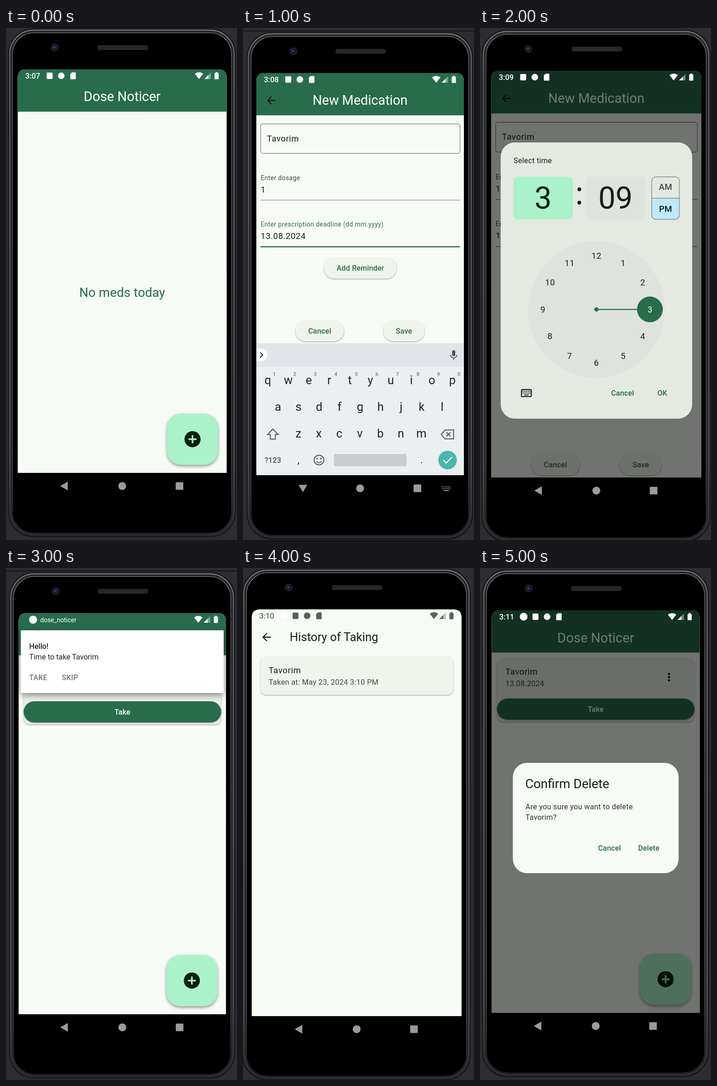
Animation of 503 by 1114 pixels, one loop 6000 ms. Source, as an HTML page:

```html
<!DOCTYPE html>
<html lang="en">
<head>
<meta charset="utf-8">
<title>Medication reminder app</title>
<style>
html, body { margin: 0; width: 100%; height: 100%; overflow: hidden; background: #2c2d31; }
svg {
  position: absolute; inset: 0; width: 100%; height: 100%; visibility: hidden;
  font-family: Roboto, "Noto Sans", sans-serif;
  animation: show 6s step-end infinite;
  animation-delay: calc((var(--i) - 6) * 1s);
}
@keyframes show {
  0% { visibility: visible; }
  16.6667%, 100% { visibility: hidden; }
}
pattern { visibility: visible; }
.mid { text-anchor: middle; }
.med { font-weight: 500; }
.line { fill: none; stroke-width: 2; }
.lift { filter: drop-shadow(0 1.2px 1px #0006); }
.float { filter: drop-shadow(0 3px 3px #0006); }
.high { filter: drop-shadow(0 4px 7px #0007); }
</style>
</head>
<body>
<script>
const GREEN = '#286c4c', PAPER = '#f6fbf5', CARD = '#eff4ed', MINT = '#abf2c9';
const INK = '#171d19', SOFT = '#3f4943', EDGE = '#707972', DIAL = '#dee4dd', KEY = '#17262c';
const APP = 'Dose Noticer', MED = 'Tavorim', DATE = '13.08.2024';

const rect = (x, y, w, h, r, fill, more = '') =>
  `<rect x="${x}" y="${y}" width="${w}" height="${h}" rx="${r}" fill="${fill}" ${more}/>`;
const disc = (x, y, r, fill, more = '') =>
  `<circle cx="${x}" cy="${y}" r="${r}" fill="${fill}" ${more}/>`;
const path = (d, fill, more = '') => `<path d="${d}" fill="${fill}" ${more}/>`;
const line = (d, color, w = 2, more = '') =>
  `<path class="line" d="${d}" stroke="${color}" style="stroke-width:${w}" ${more}/>`;
const text = (x, y, size, str, fill, gap = 0, cls = '') =>
  `<text x="${x}" y="${y}" font-size="${size}" fill="${fill}" letter-spacing="${gap}" class="${cls}">${str}</text>`;
const at = (x, y, body, scale = 1) =>
  `<g transform="translate(${x} ${y}) scale(${scale})">${body}</g>`;

const topRound = ({ l, t, r, b }, bottom = b) =>
  `M${l} ${bottom}V${t + 18}q0 -18 18 -18H${r - 18}q18 0 18 18V${bottom}z`;
const dim = s => path(topRound(s), '#000', 'opacity=".54"');

function shell({ l, t, r, b, band }) {
  const ring = (inset, radius, fill, stroke, w) =>
    rect(l - 20 + inset, t - 88 + inset, r - l + 39 - 2 * inset, b - t + 227 - 2 * inset,
      radius, fill, `stroke="${stroke}" stroke-width="${w}"`);
  const mid = (l + r) / 2, y = t - 47.5;
  return rect(0, 0, 503, 1114, 0, '#2c2d31')
    + (band ? rect(0, 5, 503, 2.5, 0, '#18191b') : '')
    + ring(0, 54, '#0c0c0d', '#1b1c1e', 2)
    + ring(2.5, 52, '#2b2c2f', 'url(#metal)', 1.6)
    + ring(5.5, 49, '#111214', '#303236', 2)
    + ring(8.5, 46, '#000', 'url(#metal)', 1.2)
    + disc(l + 80.5, y, 8.5, '#202127') + disc(l + 80.5, y, 5.5, '#14162a') + disc(l + 80, y - .5, 2.6, '#33407c')
    + rect(mid - 53.5, y - 5, 109.5, 10.5, 4, 'url(#mesh)');
}

const sdCard = c => path('M-2.5 -7.5H5q1 0 1 1V6.5q0 1 -1 1H-5q-1 0 -1 -1V-4z', c);

function status(s, time, c, extra) {
  const y = s.t + 14;
  let x = s.l + 69.5, out = text(s.l + 16.5, y + 6, 16.4, time, c, 0, 'med');
  if (extra) { out += disc(x, y, 8.5, extra); x += 25.8; }
  return out + rect(x - 6.5, y - 7, 13, 14, 2, c) + disc(x + 25.3, y, 7.2, c)
    + at(x + 51, y, sdCard(c)) + signals(s, c);
}

const signals = (s, c) => at(s.r, s.t + 14,
  path('M-69.5 -4.5Q-60.3 -11 -51 -4.5L-60.3 7z', c)
  + path('M-48.5 7L-34.5 -7V7z', c, 'opacity=".4"') + path('M-48.5 7L-40 -1.5V7z', c)
  + rect(-26.5, -6, 9, 13.5, 1.2, c) + rect(-24.2, -8, 4.4, 3, 0, c));

function nav(s, keyboard) {
  const m = (s.l + s.r) / 2, c = '#9b9b9b';
  const keys = [-4, 0].map(y => line(`M-9 ${y}h19`, c, 2, 'stroke-dasharray="2 1.5"')).join('');
  return at(m, s.b + 28.5,
    path(keyboard ? 'M-134 -7.5h19l-9.5 16z' : 'M-135 0L-118.5 -9.5v19z', c)
    + disc(0, 0, 8.6, c) + rect(116.5, -8.3, 16.6, 16.6, 1.5, c)
    + (keyboard ? at(187, 1, keys + line('M-5 4h11', c)) : ''));
}

const bar = s => path(topRound(s, s.t + 92), GREEN);
const back = (x, y, c) => at(x, y, line('M9.3 0H-7.6M.8 -8.5L-7.7 0L.8 8.5', c, 2.3));
const fab = s => at(s.r - 74.3, s.b - 73.3,
  rect(-55.7, -55.7, 111.5, 111.5, 31, MINT, 'class="float"') + disc(0, 0, 17.5, '#02200f')
  + line('M-8.7 0H8.7M0 -8.7V8.7', MINT, 3.6));
const screen = (s, body) => shell(s) + path(topRound(s), PAPER) + body;
const label = (x, y, str, size = 16.1, c = GREEN) => text(x, y, size, str, c, .12, 'mid med');
const body = (x, y, str, size = 18.4, c = INK) => text(x, y, size, str, c, .58);
const small = (x, y, str, c = SOFT, size = 16.2) => text(x, y, size, str, c, .29);
const pill = (x, y, w, str) =>
  rect(x - w / 2, y - 23, w, 46, 23, CARD, 'class="lift"') + label(x, y + 5.5, str);

function form(focus, buttonY) {
  return path('M29 190V116q0 -18 18 -18H463q18 0 18 18V190z', GREEN)
    + back(61.5, 157.5, INK) + text(255, 167, 28.7, 'New Medication', '#fff', 0, 'mid')
    + rect(38.5, 208.7, 434, 64, 4.5, 'none', `stroke="${EDGE}" stroke-width="1.2"`)
    + body(52, 246.5, MED)
    + text(38.5, 331, 13.8, 'Enter dosage', SOFT, .44)
    + body(38.5, 357.5, '1') + line('M38.5 374.5H472.5', EDGE, 1.2)
    + text(38.5, 432, 13.8, 'Enter prescription deadline (dd.mm.yyyy)', focus ? GREEN : SOFT, .44)
    + body(38.5, 459, DATE)
    + line('M38.5 476H472.5', focus ? GREEN : EDGE, focus ? 2.3 : 1.2)
    + pill(255.5, 522.5, 159, 'Add Reminder')
    + pill(167, buttonY, 106, 'Cancel') + pill(350.5, buttonY, 91, 'Save');
}

function keyboard() {
  const row = (keys, x, y) =>
    [...keys].map((k, i) => text(x + i * 44.65, y, 25.5, k, KEY, 0, 'mid')).join('');
  const hints = [...'1234567890'].map((k, i) =>
    text(68 + i * 44.7, 757, 11.5, k, '#737b7f', 0, 'mid med')).join('');
  const g = '#4a5459';
  return rect(29, 686, 452, 287, 0, '#ebeff2') + rect(29, 686, 452, 51, 0, '#e1e5e9')
    + path('M29 697.5h10a14 14 0 0 1 0 28h-10z', '#fff') + line('M37.5 706l5.5 5.5l-5.5 5.5', INK)
    + rect(455.3, 701, 7, 13, 3.5, g) + line('M451.8 711a7 7 0 0 0 14 0M458.8 718v4', g, 1.8)
    + row('qwertyuiop', 54, 775) + hints
    + row('asdfghjkl', 76.3, 833) + row('zxcvbnm', 120.5, 891)
    + line('M65 872.5L53.5 884.5H59.5V894.5H70.5V884.5H76.5z', g)
    + line('M440 874.5H458.5V894H440L431.5 884.2zM443 879.5l9 9m0 -9l-9 9', g)
    + text(65, 946, 16.5, '?123', '#455056', 0, 'mid med')
    + text(121, 947, 22, ',', KEY, 0, 'mid') + text(389, 947, 22, '.', KEY, 0, 'mid')
    + disc(165.5, 940, 10.5, 'none', `stroke="${g}" stroke-width="2"`)
    + disc(161.7, 937, 1.7, g) + disc(169.3, 937, 1.7, g) + line('M160 942.5q5.5 7 11 0', g, 1.8)
    + rect(198, 927, 158, 26.5, 3, '#c8cccf')
    + disc(445.5, 940, 20.2, '#4db6ac') + line('M436.5 940.5l6 6l12.5 -12.5', '#fff', 2.2);
}

function picker() {
  const cx = 253.5, cy = 612.3;
  const hours = Array.from({ length: 12 }, (_, i) => {
    const a = (i + 1) * Math.PI / 6;
    return text(cx + 116.6 * Math.sin(a), cy + 6.3 - 116.6 * Math.cos(a), 18.6, i + 1,
      i === 2 ? '#fff' : INK, .4, 'mid');
  }).join('');
  const keys = [-4, 0].map(y => line(`M-8.2 ${y}h17`, INK, 2.2, 'stroke-dasharray="2.2 1.5"')).join('');
  return rect(45, 249, 417, 601, 31, '#e4e9e2')
    + small(73, 294, 'Select time', INK)
    + rect(73.3, 323.5, 129, 93, 9, MINT) + text(137.5, 392.5, 66.4, '3', '#02200f', 0, 'mid')
    + disc(216.3, 351, 4.2, INK) + disc(216.3, 380, 4.2, INK)
    + rect(230, 323.5, 130, 93, 9, DIAL) + text(295, 392.5, 66.4, '09', INK, 0, 'mid')
    + path('M374 370.3h60v37q0 9 -9 9h-42q-9 0 -9 -9z', '#bfe8fb')
    + rect(374, 323.8, 60, 92.5, 9, 'none', `stroke="${EDGE}" stroke-width="1.2"`)
    + line('M374 370.3h60', EDGE, 1.2)
    + label(404, 352, 'AM', 18.6, SOFT) + label(404, 399.5, 'PM', 18.6, '#001f2a')
    + disc(cx, cy, 149, DIAL) + line(`M${cx} ${cy}H345`, GREEN, 2.2)
    + disc(cx, cy, 4.6, GREEN) + disc(370, cy, 28, GREEN) + hours
    + at(101, 794.3, rect(-10.7, -7.7, 21.4, 15.4, 1.5, 'none', `stroke="${INK}" stroke-width="2.2"`)
      + keys + line('M-5 4.2h10', INK))
    + label(310.5, 800, 'Cancel') + label(397, 800, 'OK');
}

const medCard = rect(37, 196, 430, 138.5, 13, '#e9eee7', 'class="lift"')
  + body(55.5, 231.5, MED) + small(55.5, 257, DATE)
  + [230.5, 237.5, 244.5].map(y => disc(411.5, y, 2.4, INK)).join('')
  + rect(37, 284, 430, 46, 23, GREEN, 'class="lift"') + label(252, 312.5, 'Take', 16.1, '#fff');

const notice = rect(32, 135.5, 442, 136.5, 2, '#fff', 'class="high"')
  + text(50.5, 176, 16.1, 'Hello!', '#212121', 0, 'med')
  + text(50.5, 198.5, 16.2, 'Time to take ' + MED, '#212121')
  + text(50.5, 244, 16.1, 'TAKE', '#757575', .2, 'med') + text(121.5, 244, 16.1, 'SKIP', '#757575', .2, 'med');

const confirmBox = rect(71.5, 424, 361, 240, 31, PAPER)
  + text(98.5, 479, 27.7, 'Confirm Delete', INK)
  + small(99, 524.5, 'Are you sure you want to delete', '#2a312d')
  + small(99, 547.5, MED + '?', '#2a312d')
  + label(282, 614.5, 'Cancel') + label(367.5, 614.5, 'Delete');

const scenes = [
  [{ l: 25.5, t: 90, r: 480.5, b: 968 }, s => bar(s)
    + text(253, 159, 29, APP, '#fff', 0, 'mid') + text(253, 585, 27.8, 'No meds today', GREEN, 0, 'mid')
    + fab(s) + status(s, '3:07', '#fff')],
  [{ l: 29, t: 98, r: 481, b: 973, band: 1 }, s => form(true, 659) + keyboard() + status(s, '3:08', '#fff')],
  [{ l: 24.5, t: 93, r: 482, b: 978 }, s => at(s.l, s.t, at(-29 * 1.0122, -98 * 1.0122, form(false, 944.7), 1.0122))
    + dim(s) + picker() + status(s, '3:09', '#fff')],
  [{ l: 27.5, t: 98, r: 479, b: 971, band: 1 }, s => bar(s) + at(1.5, 6, medCard) + fab(s)
    + notice + disc(59, 112.5, 8.7, '#fff')
    + text(74.5, 118, 13.8, 'dose_noticer', '#fff') + signals(s, '#fff')],
  [{ l: 19, t: 90, r: 476, b: 975 }, s => status(s, '3:10', '#5b605c', '#fff')
    + back(51.3, 150.5, INK) + text(101.8, 158.5, 25.6, 'History of Taking', INK)
    + rect(38, 193, 420, 83, 13, CARD, 'class="lift"')
    + body(55.7, 228.5, MED, 18.6)
    + small(56, 254, 'Taken at: May 23, 2024 3:10 PM', SOFT, 16.3)],
  [{ l: 25.5, t: 92, r: 478.5, b: 968 }, s => bar(s) + text(252, 161.5, 29, APP, '#fff', 0, 'mid')
    + medCard + fab(s) + dim(s) + confirmBox + status(s, '3:11', '#fff', '#fff')],
];

const defs = `<defs>
  <pattern id="mesh" width="4" height="4" patternUnits="userSpaceOnUse">
    <path d="M0 0h4v4h-4z" fill="#1b1b1b"/><path d="M0 0l4 4M4 0l-4 4" stroke="#383838" stroke-width=".8"/>
  </pattern>
  <linearGradient id="metal" x2="0" y2="1">
    <stop stop-color="#a0a2a5"/><stop offset=".06" stop-color="#76787c"/>
    <stop offset=".85" stop-color="#66686c"/><stop offset="1" stop-color="#2c2d30"/>
  </linearGradient></defs>`;

document.body.innerHTML = scenes.map(([s, draw], i) =>
  `<svg viewBox="0 0 503 1114" style="--i:${i}">${i ? '' : defs}${screen(s, draw(s))}${nav(s, i === 1)}</svg>`
).join('');
</script>
</body>
</html>
```
